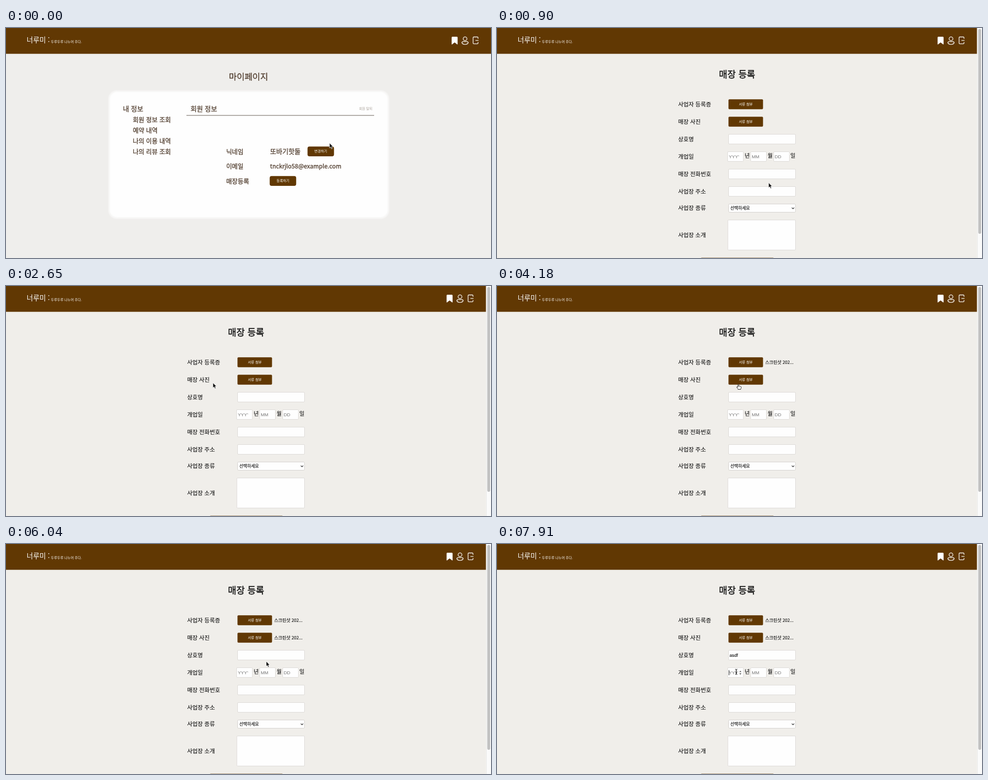
Animation of 1000x475 px, one loop 8 s. Source, as an HTML page:

```html
<!DOCTYPE html>
<html lang="ko">
<head>
<meta charset="utf-8">
<title>매장 등록</title>
<style>
  html, body { margin: 0; width: 100%; height: 100%; overflow: hidden; background: #f0eeea; }
  svg { display: block; width: 100%; height: 100%; }
  text { font-family: "Noto Sans CJK KR", "Noto Sans CJK", sans-serif; white-space: pre; }
  .latin { font-family: "Liberation Sans", Arial, sans-serif; }
  .ink { stroke: #503d2e; stroke-width: .3; }
  .title { stroke: #111; stroke-width: .35; }
  .field { stroke: #111; stroke-width: .15; }
</style>
</head>
<body>
<svg viewBox="0 0 1000 475" xmlns="http://www.w3.org/2000/svg">
  <defs>
    <clipPath id="yearClip"><rect id="yearClipBox" x="476" y="256" width="23" height="20"/></clipPath>
  </defs>
  <rect id="back" width="1000" height="475"/>
  <g id="profile"></g>
  <g id="form"></g>
  <rect id="bar" width="1000" height="53.3" fill="#613803"/>
  <g id="brand"></g>
  <g id="icons" fill="none" stroke="#fff" stroke-width="1.3" stroke-linecap="round" stroke-linejoin="round">
    <path d="M920.5 18.6h9q1 0 1 1v13.7l-5.5-4.2-5.5 4.2v-13.7q0-1 1-1z" fill="#fff"/>
    <circle cx="946.5" cy="22.3" r="3.9"/>
    <path d="M943 28.2h7q3 0 3 2.4-1.5 3.2-6.5 3.2t-6.5-3.2q0-2.4 3-2.4z"/>
    <path d="M973.3 21.8v-1.7q0-1.6-1.6-1.6h-7q-1.6 0-1.6 1.6v11q0 1.6 1.6 1.6h7q1.6 0 1.6-1.6v-1.7M968.5 25.6h5.3"/>
  </g>
  <g id="scroll">
    <rect x="989.5" width="10.5" height="475" fill="#fafafa"/>
    <path d="M990.5 0V475" stroke="#e7e6e5"/>
    <rect x="992.3" y="2" width="6" height="423" rx="3" fill="#c1c1c1"/>
  </g>
  <g id="pointer">
    <path id="arrow" d="M0 0V10.4L2.4 8.3 4 12 5.9 11.2 4.3 7.6H7.4Z" fill="#111" stroke="#fff" stroke-width=".8"/>
    <path id="hand" d="M-.9 1q0-1 .9-1t.9 1V4.2l.5-.6q.9-.5 1.4.4.9-.6 1.5.4 1.2-.5 1.6.8V7.2q0 1.4-.9 2.4v.8H-.6v-.8L-3.2 6.3q-.5-1.2.6-1.3l1.7 1Z" fill="#fff" stroke="#111" stroke-width=".9" stroke-linejoin="round"/>
    <path id="beam" d="M-2.2 -5.5Q0 -5.5 0 -4V4Q0 5.5 -2.2 5.5M2.2 -5.5Q0 -5.5 0 -4V4Q0 5.5 2.2 5.5M-1.3 1.8H1.3" fill="none" stroke="#111"/>
  </g>
</svg>
<script>
const LOOP = 8000, HOLD = 40;
const BROWN = '#613803', INK = '#503d2e', BLACK = '#111';
const $ = id => document.getElementById(id);
const brand = $('brand'), profile = $('profile'), form = $('form');

function add(parent, tag, attrs, content) {
  const el = document.createElementNS('http://www.w3.org/2000/svg', tag);
  for (const k in attrs) el.setAttribute(k, attrs[k]);
  if (content) el.textContent = content;
  parent.appendChild(el);
  return el;
}

// Text placed by its left edge and vertical centre
const label = (g, x, cy, size, content, fill, more) =>
  add(g, 'text', { x, y: cy + size * .37, 'font-size': size, fill, ...more }, content);

const rect = (x, y, w, h) => ({ x, y, w, h });
const centre = r => [r.x + r.w / 2, r.y + r.h / 2];
const inside = (px, py, r) => px >= r.x && px <= r.x + r.w && py >= r.y && py <= r.y + r.h;

const box = (g, r, fill, rx, stroke = 'none') =>
  add(g, 'rect', { x: r.x, y: r.y, width: r.w, height: r.h, rx, fill, stroke });

function button(g, r, rx, content) {
  const [cx, cy] = centre(r);
  box(g, r, BROWN, rx);
  label(g, cx, cy - .2, 7.2, content, '#fff', { 'text-anchor': 'middle' });
}

label(brand, 42.6, 25, 14.4, '너루미 :', '#fff');
label(brand, 92.6, 28, 7, '두루두루 나누어 주다.', '#fff');

// Profile page
const inked = (x, y, size, s, more) => label(profile, x, y, size, s, INK, { class: 'ink', ...more });
const changeButton = rect(621.7, 244.7, 54.6, 20.4);
const registerButton = rect(543.7, 305.7, 54.6, 20.4);

['#f5f4f3', '#f9f9f8', '#fefefe'].forEach((fill, i) =>
  box(profile, rect(210.5 + i * 2, 128.5 + i * 2, 580 - i * 4, 266 - i * 4), fill, 18 - i * 1.5));
inked(500, 100, 17.6, '마이페이지', { 'text-anchor': 'middle' });
inked(241, 166.5, 13.8, '내 정보');
inked(380.5, 166.5, 13.8, '회원 정보');
['회원 정보 조회', '예약 내역', '나의 이용 내역', '나의 리뷰 조회'].forEach((s, i) =>
  inked(261.5, 189 + i * 22.2, 12.9, s));
['닉네임', '이메일', '매장등록'].forEach((s, i) => inked(454, 255 + i * 30.7, 12.9, s));
inked(544.5, 255, 13.7, '또바기핫둘');
inked(544.5, 285.7, 12.3, 'tnckrjlo58@example.com');
label(profile, 728, 166, 6.9, '회원 탈퇴', '#aaa29b');
add(profile, 'path', { d: 'M372 180.5H759', stroke: '#918a84', 'stroke-width': 1.4 });
button(profile, changeButton, 4, '변경하기');
button(profile, registerButton, 4, '등록하기');

// Registration page: evenly spaced rows
const row = i => 157.5 + i * 36;
const wide = (i, h = 20) => rect(477.5, row(i) - h / 2, 138, h);
const uploads = [0, 1].map(i => rect(477.3, row(i) - 10.2, 71.2, 20.4));
const dates = [0, 1, 2].map(i => rect(475.5 + i * 47.5, row(3) - 10, 32.5, 20));
const [yearBox] = dates;
const inputs = [wide(2), ...dates, wide(4), wide(5), rect(476, 396.5, 139.5, 62)];
const field = (x, y, size, s) => label(form, x, y, size, s, BLACK, { class: 'field' });

label(form, 495, 96.5, 18.9, '매장 등록', BLACK, { class: 'title', 'text-anchor': 'middle' });
['사업자 등록증', '매장 사진', '상호명', '개업일', '매장 전화번호', '사업장 주소'].forEach((s, i) =>
  field(373.6, row(i) + .5, 11.7, s));
field(373.6, 372, 11.7, '사업장 종류');
field(373.6, 427.5, 11.7, '사업장 소개');
uploads.forEach(r => button(form, r, 2, '서류 첨부'));
inputs.forEach(r => box(form, r, '#fefefe', 1.5, '#dcd9d6'));
box(form, rect(477.5, 363.5, 138, 17), '#fefefe', 2, '#d3d0cd');
field(481, 372, 8.8, '선택하세요');
add(form, 'path', { d: 'M607.8 370.8l2.5 2.6 2.5-2.6', fill: 'none', stroke: '#222', 'stroke-width': 1.1 });
['년', '월', '일'].forEach((s, i) => field(510.7 + i * 47.2, 264, 11.2, s));
['YYYY', 'MM', 'DD'].forEach((s, i) =>
  label(form, 478 + i * 47.2, row(3) + .1, 9.5, s, '#777',
    { class: 'latin', 'clip-path': i ? 'none' : 'url(#yearClip)' }));
box(form, rect(420, 474.4, 151, 10), BROWN, 2);

const files = uploads.map((r, i) => field(553, row(i), 9.05, '스크린샷 202...'));
const typed = label(form, 479.5, row(2) - .2, 9.2, '', BLACK, { class: 'latin field' });
const caret = add(form, 'path', { stroke: BLACK });
const spinner = add(form, 'path', { d: 'M499.6 264.6l2.2-3 2.2 3zM499.6 267l2.2 3 2.2-3z', fill: '#666' });

// Each move starts where the last one ended unless "from" makes it jump
const moves = [
  { at: 0, from: [667, 237.5] },
  { at: 120, ms: 510, to: centre(registerButton) },
  { at: 900, ms: 720, from: [560, 319.5], to: centre(uploads[0]) },
  { at: 2650, from: [426.7, 200] },
  { at: 3660, from: [440, 239] },
  { at: 3980, ms: 370, to: centre(uploads[1]) },
  { at: 4950, from: [450, 214] },
  { at: 5790, ms: 370, from: [597, 323], to: [528, 231] },
  { at: 6470, ms: 200, to: [514, 228] },
  { at: 7420, ms: 490, from: [511.5, 214], to: [493.3, 264] }
];
moves.forEach((m, i) => {
  m.from = m.from || moves[i - 1].to;
  m.to = m.to || m.from;
});

const PAGE = 900, FILES = [3660, 5790], FOCUS = 6670, TYPE = 6880, KEY = 63, RETURN = 7420, YEAR = 7910;
const WORD = 'asdf';

function pointerAt(t) {
  const { at, ms = 0, from, to } = moves.filter(m => m.at <= t).pop();
  const age = t - at;
  const p = age >= ms ? 1 : Math.floor(age / HOLD) * HOLD / ms;
  const e = 1 - (1 - p) ** 2;
  return from.map((v, i) => v + (to[i] - v) * e);
}

const show = (el, on) => el.setAttribute('visibility', on ? 'visible' : 'hidden');
const showGroup = (el, on) => el.setAttribute('display', on ? 'inline' : 'none');

function drawPage(onForm) {
  $('back').setAttribute('fill', onForm ? '#f0eeea' : '#efeeec');
  showGroup(profile, !onForm);
  showGroup(form, onForm);
  showGroup($('scroll'), onForm);
  $('icons').setAttribute('transform', `translate(${onForm ? -10.4 : 0} 0)`);
}

function drawFields(t) {
  files.forEach((f, i) => show(f, t >= FILES[i]));
  const count = Math.max(0, Math.min(WORD.length, 1 + Math.floor((t - TYPE) / KEY)));
  typed.textContent = WORD.slice(0, count);
  const inYear = t >= YEAR;
  const x = inYear ? 478.3 : 479.7 + (count ? typed.getComputedTextLength() : 0);
  caret.setAttribute('d', `M${x} ${row(inYear ? 3 : 2) - 5}v10.5`);
  show(caret, t >= FOCUS);
}

function drawPointer(t, onForm) {
  const [x, y] = pointerAt(t);
  const over = list => list.some(r => inside(x, y, r));
  const hand = over(onForm ? uploads : [changeButton, registerButton]);
  const beam = onForm && over(inputs);
  const seen = t < TYPE || t >= RETURN;
  show($('hand'), seen && hand);
  show($('beam'), seen && beam);
  show($('arrow'), seen && !hand && !beam);
  $('pointer').setAttribute('transform', `translate(${x.toFixed(2)} ${y.toFixed(2)})`);

  const hover = onForm && inside(x, y, yearBox);
  showGroup(spinner, hover);
  $('yearClipBox').setAttribute('width', hover ? 21.5 : 23);
}

function draw(t) {
  const onForm = t >= PAGE;
  drawPage(onForm);
  drawFields(t);
  drawPointer(t, onForm);
}

const begin = performance.now();
function tick(now) {
  draw(Math.max(0, now - begin) % LOOP);
  requestAnimationFrame(tick);
}
draw(0);
requestAnimationFrame(tick);
</script>
</body>
</html>
```
